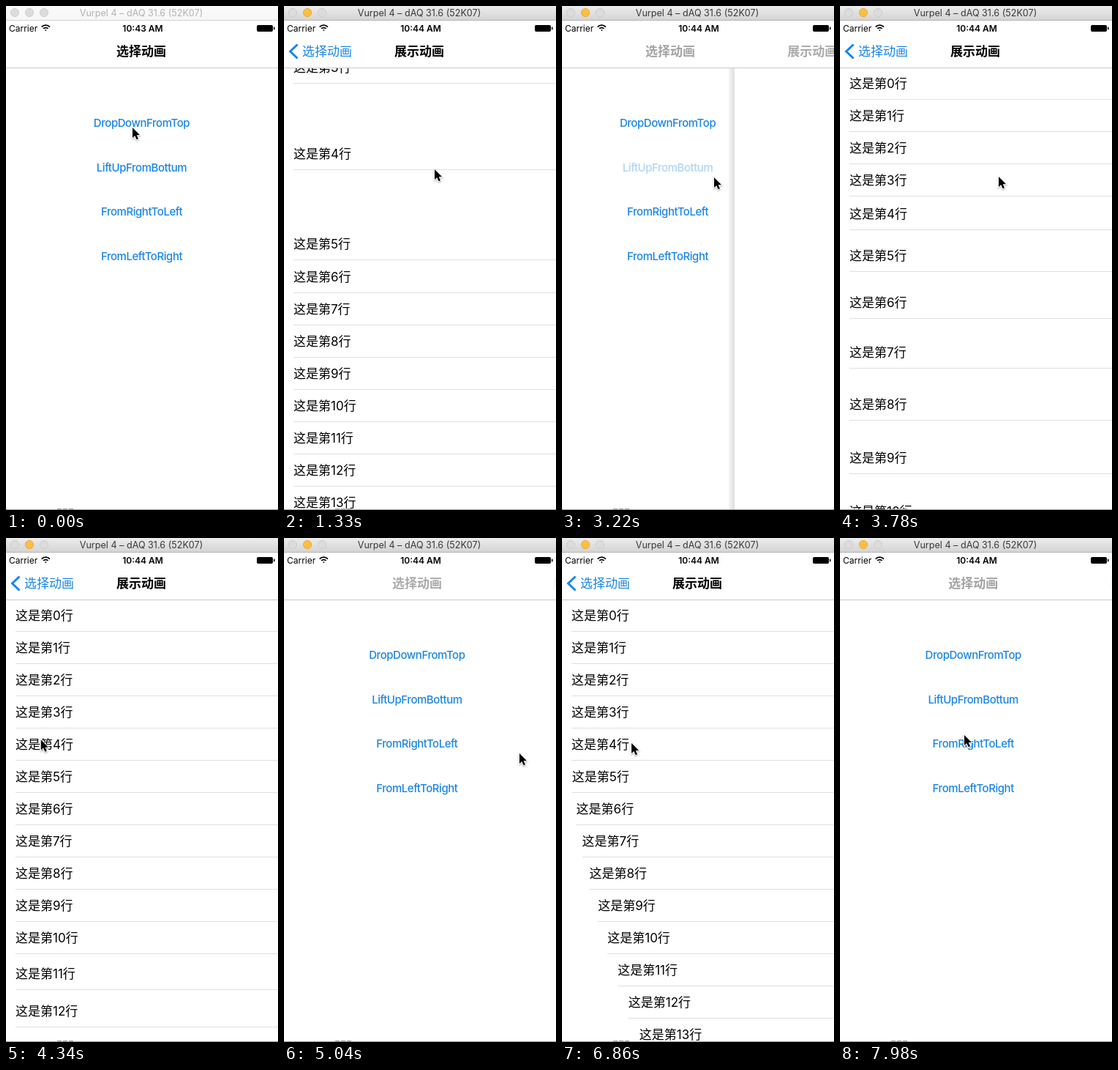
These frames come from a looping animation (372 by 688 pixels, 8000 ms). An HTML page with a canvas:

```html
<!DOCTYPE html>
<html lang="zh-CN">
<head>
<meta charset="utf-8">
<style>
  html, body { margin: 0; width: 100%; height: 100%; overflow: hidden; background: #fff; }
  canvas { display: block; width: 372px; height: 688px; }
</style>
</head>
<body>
<canvas width="372" height="688"></canvas>
<script>
const ctx = document.querySelector('canvas').getContext('2d');
const W = 372, H = 688, NAV = 85, LOOP = 8000, STEP = 70;
const FONT = 'Inter, "Noto Sans CJK SC", "Noto Sans CJK", sans-serif';
const BLUE = '#1a85e6';
const MENU = [['DropDownFromTop', 164.5], ['LiftUpFromBottum', 225.5],
              ['FromRightToLeft', 285.5], ['FromLeftToRight', 346.5]];

// Each visit opens the list from one menu button and later goes back.
const VISITS = [
  { push: 500, pop: 2150, button: 0, offset: dropDown },
  { push: 3150, pop: 4752, button: 1, offset: liftUp },
  { push: 5642, pop: 7685, button: 2, offset: fromRight }
];
// Pointer path: time, x, y
const POINTER = [
  [0, 173, 166], [150, 174, 165], [500, 178, 163], [1330, 206, 223],
  [1950, 12, 240], [2150, 60, 245], [2450, 300, 240], [3000, 205, 228],
  [3220, 208, 234], [3780, 217, 233], [4550, 10, 285], [4775, 90, 288],
  [5040, 322, 294], [5560, 215, 285], [6020, 223, 307], [7500, 10, 262],
  [7700, 30, 264], [7980, 170, 269], [8000, 173, 269]
];

const clamp = v => Math.max(0, Math.min(1, v));

// Remaining distance of a slightly underdamped spring, stopped at its rest point.
function spring(z) {
  const damping = 0.85, w = Math.sqrt(1 - damping * damping);
  if (z > 4.9) return 0;
  return Math.max(0, Math.exp(-damping * z) * (Math.cos(w * z) + damping / w * Math.sin(w * z)));
}
// Page transitions follow a critically damped spring.
function slide(ms) {
  const z = 0.01826 * Math.max(0, ms);
  return 1 - (1 + z) * Math.exp(-z);
}

// Row offsets [x, y]; ms counts from the start of the push.
function dropDown(row, ms) {
  const fall = clamp((ms - 83 - (13 - row) * 30.9) / 500);
  return [0, -661 * (1 - fall * fall)];
}
function liftUp(row, ms) {
  return [0, 661 * spring(Math.max(0, ms - 50) / (49.3 + 18.3 * row))];
}
function fromRight(row, ms) {
  return [600 * spring(Math.max(0, ms - 50) / (134 + 21.6 * row)), 0];
}

function text(str, x, y, size, color, { align = 'left', weight = 400, alpha = 1, spacing = 0 } = {}) {
  if (alpha <= 0) return;
  ctx.globalAlpha = alpha;
  ctx.font = `${weight} ${size}px ${FONT}`;
  ctx.letterSpacing = spacing + 'px';
  ctx.textAlign = align;
  ctx.fillStyle = color;
  ctx.fillText(str, x, y);
  ctx.globalAlpha = 1;
}
function rect(x, y, w, h, color) {
  ctx.fillStyle = color;
  ctx.fillRect(x, y, w, h);
}
function polygon(points) {
  ctx.beginPath();
  points.forEach(([x, y]) => ctx.lineTo(x, y));
}

function drawMenu(shift, t) {
  MENU.forEach(([label, y], i) => {
    let alpha = 1;
    for (const v of VISITS) {
      const since = t - v.push;
      if (v.button === i && since > -120 && since < 400) alpha = 0.35 + 0.65 * clamp((since - 100) / 300);
    }
    text(label, 185.5 + shift, y, 15, BLUE, { align: 'center', weight: 500, alpha, spacing: -0.45 });
  });
}

function drawList(left, visit, t, shadow) {
  if (shadow > 0) {
    const g = ctx.createLinearGradient(left - 8, 0, left, 0);
    g.addColorStop(0, `rgba(0,0,0,${0.04 * shadow})`);
    g.addColorStop(1, `rgba(0,0,0,${0.13 * shadow})`);
    rect(left - 8, NAV, 8, H, g);
  }
  rect(left, NAV, W, H, '#fff');
  for (let row = 0; row < 14; row++) {
    const [dx, dy] = visit.offset(row, t - visit.push);
    const x = left + dx + 13, line = Math.round(127 + 44 * row + dy);
    if (x > W || line < NAV - 5 || line > H + 44) continue;
    text(`这是第${row}行`, x, line - 15.5, 17, '#000');
    rect(x, line, W, 1, '#dfdfe1');
  }
}

function drawNavigation(visit, t, p) {
  rect(0, 20, W, 64, '#fff');
  rect(0, 84, W, 1, '#c9c9c9');
  let menuAlpha = 1, listAlpha = 0, backAlpha = 0, travel = 1;
  if (visit) {
    const pushed = t - visit.push, popped = t - visit.pop;
    if (popped < 0) {
      menuAlpha = 1 - clamp(pushed / 110);
      listAlpha = clamp(pushed / 210);
      backAlpha = clamp((pushed - 80) / 250);
    } else {
      menuAlpha = clamp((popped - 200) / 260);
      listAlpha = 1 - clamp(popped / 300);
      backAlpha = 1 - clamp(popped / 160);
      travel = 0.9;
    }
  }
  const style = alpha => ({ align: 'center', weight: 600, alpha });
  text('选择动画', 185 - 101 * travel * p, 68.2, 17, '#000', style(menuAlpha));
  text('展示动画', 185 + 248 * travel * (1 - p), 68.2, 17, '#000', style(listAlpha));
  text('选择动画', 25, 68.2, 17, BLUE, { alpha: backAlpha });
  if (backAlpha > 0) {
    ctx.globalAlpha = backAlpha;
    polygon([[18.5, 52.5], [8.5, 62], [18.5, 71.5]]);
    ctx.strokeStyle = BLUE;
    ctx.lineWidth = 3;
    ctx.stroke();
    ctx.globalAlpha = 1;
  }
}

function drawStatus(t) {
  text('Carrier', 4, 34.5, 12, '#000');
  text(t < 770 ? '10:43 AM' : '10:44 AM', 187, 34.5, 12, '#000', { align: 'center', weight: 600 });
  ctx.strokeStyle = '#000';
  ctx.lineWidth = 1.8;
  for (const r of [1, 4.6, 8]) {
    ctx.beginPath();
    ctx.arc(54.3, 34.2, r, -Math.PI * 0.75, -Math.PI * 0.25);
    ctx.stroke();
  }
  ctx.fillStyle = '#000';
  ctx.beginPath();
  ctx.roundRect(343, 26, 22, 9, 2);
  ctx.roundRect(366, 28.5, 1.5, 4, 1);
  ctx.fill();
}

function drawTitleBar(active) {
  const g = ctx.createLinearGradient(0, 0, 0, 20);
  g.addColorStop(0, active ? '#ececec' : '#fafafa');
  g.addColorStop(1, active ? '#d3d3d3' : '#f6f6f6');
  rect(0, 0, W, 20, g);
  rect(0, 19, W, 1, active ? '#b4b4b4' : '#d2d2d2');
  [12, 32, 52].forEach((x, i) => {
    const yellow = active && i === 1;
    ctx.beginPath();
    ctx.arc(x, 9, 5.6, 0, 7);
    ctx.fillStyle = yellow ? '#fdbf41' : '#dcdcdc';
    ctx.fill();
    ctx.strokeStyle = yellow ? '#e0a136' : '#c8c8c8';
    ctx.lineWidth = 0.8;
    ctx.stroke();
  });
  text('Vurpel 4 – dAQ 31.6 (52K07)', 185, 14, 12.6, active ? '#383838' : '#b2b2b2', { align: 'center' });
}

function drawPointer(t) {
  const next = Math.max(1, POINTER.findIndex(k => k[0] > t));
  const [t0, x0, y0] = POINTER[next - 1], [t1, x1, y1] = POINTER[next];
  const k = clamp((t - t0) / (t1 - t0)), e = k * k * (3 - 2 * k);
  ctx.save();
  ctx.translate(x0 + (x1 - x0) * e, y0 + (y1 - y0) * e);
  polygon([[0, 0], [0, 14], [3.2, 11], [5.6, 16.3], [8, 15.2], [5.7, 10.2], [10, 10]]);
  ctx.closePath();
  ctx.shadowColor = 'rgba(0,0,0,.35)';
  ctx.shadowBlur = 2;
  ctx.shadowOffsetY = 1;
  ctx.strokeStyle = '#fff';
  ctx.lineWidth = 2;
  ctx.stroke();
  ctx.shadowColor = 'transparent';
  ctx.fillStyle = '#000';
  ctx.fill();
  ctx.restore();
}

function draw(t) {
  const visit = VISITS.find(v => t >= v.push && t < v.pop + 500);
  let p = 0;
  if (visit) p = t < visit.pop ? slide(t - visit.push) : 1 - slide(t - visit.pop);
  rect(0, 0, W, H, '#fff');
  drawMenu(-112 * p, t);
  if (visit) {
    const shadow = t < visit.pop ? (t - visit.push < 500 ? 1 : 0) : clamp(p * 1.2 - 0.1);
    drawList(W * (1 - p), visit, t, shadow);
  }
  drawNavigation(visit, t, p);
  drawStatus(t);
  drawTitleBar(t >= 250);
  rect(0, 687, W, 1, '#9a9a9a');
  for (const x of [70, 78, 86]) rect(x, 686, 6, 1, '#999');
  drawPointer(t);
}

function tick() {
  const t = performance.now() % LOOP;
  draw(Math.floor(t / STEP) * STEP);
  requestAnimationFrame(tick);
}
tick();
</script>
</body>
</html>
```
